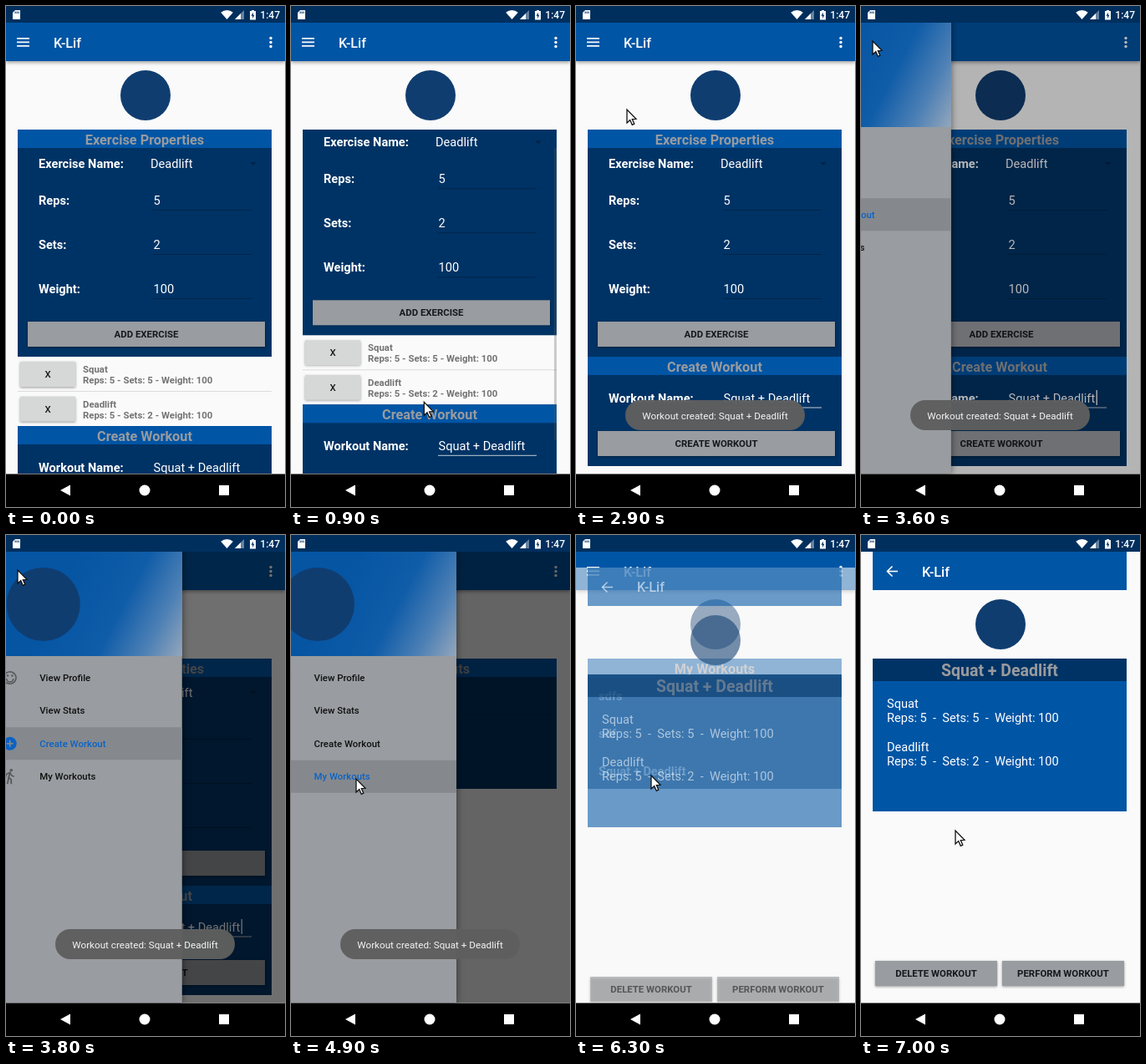
An HTML page with a canvas that plays this animation: 334x600 px, repeating every 7100 ms.

```html
<!DOCTYPE html>
<html lang="en">
<head>
<meta charset="utf-8">
<title>Workout app</title>
<style>
html, body { margin: 0; width: 100%; height: 100%; overflow: hidden; background: #fafafa; }
canvas { display: block; width: 334px; height: 600px; }
</style>
</head>
<body>
<canvas id="stage"></canvas>
<script>
const LOOP = 7100, STEP = 100;
const NAVY = '#003365', BLUE = '#0055a5', PAGE = '#fafafa', GRAY = '#999ca0', LOGO = '#103d70';
const APP_NAME = 'K-Lif', WORKOUT = 'Squat + Deadlift';
const SMALL = 11.4, BODY = 14.6, TITLE = 16.25;

const canvas = document.getElementById('stage');
const ratio = window.devicePixelRatio || 1;
canvas.width = 334 * ratio;
canvas.height = 600 * ratio;
const ctx = canvas.getContext('2d');

const clamp = x => Math.min(1, Math.max(0, x));
const progress = (t, from, to) => clamp((t - from) / (to - from));
const smooth = p => p * p * (3 - 2 * p);
const easeOut = p => 1 - (1 - p) ** 3;

function rect(x, y, w, h, color) {
  ctx.fillStyle = color;
  ctx.fillRect(x, y, w, h);
}

function disc(x, y, r, color) {
  ctx.fillStyle = color;
  ctx.beginPath();
  ctx.arc(x, y, r, 0, 7);
  ctx.fill();
}

function shape(points, color, outline) {
  ctx.beginPath();
  points.forEach(([x, y]) => ctx.lineTo(x, y));
  ctx.closePath();
  ctx.fillStyle = color;
  ctx.fill();
  if (outline) {
    ctx.strokeStyle = outline;
    ctx.lineWidth = 1.3;
    ctx.stroke();
  }
}

function line(points, color, width) {
  ctx.beginPath();
  points.forEach(([x, y]) => ctx.lineTo(x, y));
  ctx.strokeStyle = color;
  ctx.lineWidth = width;
  ctx.stroke();
}

function text(str, x, y, size, weight, color = '#fff', align = 'left') {
  ctx.font = `${weight} ${size}px Roboto, sans-serif`;
  ctx.fillStyle = color;
  ctx.textAlign = align;
  ctx.fillText(str, x, y);
}

function withShadow(blur, dy, alpha, draw) {
  ctx.save();
  ctx.shadowColor = `rgba(0,0,0,${alpha})`;
  ctx.shadowBlur = blur * ratio;
  ctx.shadowOffsetY = dy * ratio;
  draw();
  ctx.restore();
}

function button(label, x, y, w, weight = 700, color = GRAY) {
  withShadow(3, 1, 0.4, () => rect(x, y, w, 30, color));
  text(label, x + w / 2, y + 19, SMALL, weight, '#16181b', 'center');
}

function heading(label, y) {
  rect(14, y, 304, 22, BLUE);
  text(label, 166, y + 17.6, TITLE, 700, '#999b9e', 'center');
}

function field(label, value, y, underline) {
  text(label, 39, y, BODY, 700);
  text(value, 176.5, y, BODY, 400);
  rect(176, y + 6, 118, 1, underline);
}

function toolbar() {
  withShadow(4, 2, 0.35, () => rect(0, 20, 334, 46, BLUE));
  for (const y of [38, 42.5, 47]) rect(13, y, 15, 1.7, '#fff');
  for (const y of [38.5, 43.5, 48.5]) disc(317, y, 1.7, '#fff');
  text(APP_NAME, 57, 49.5, TITLE, 500);
}

function savedExercise(name, sets, y) {
  button('X', 17, y + 6, 66, 500, '#d6d7d7');
  text(name, 92, y + 19, SMALL, 700, '#737373');
  text(`Reps: 5 - Sets: ${sets} - Weight: 100`, 92, y + 32, SMALL, 700, '#737373');
}

function createPage(t) {
  const created = t >= 2200;
  const scroll = created ? 0 : 73 * smooth(progress(t, 700, 1200));
  const top = created ? 420 : 503;
  ctx.save();
  ctx.beginPath();
  ctx.rect(0, 148, 334, 412);
  ctx.clip();
  ctx.translate(0, -scroll);

  rect(14, 148, 304, 272, NAVY);
  heading('Exercise Properties', 148);
  text('Exercise Name:', 39, 194, BODY, 700);
  text('Deadlift', 173, 194, BODY, 400);
  shape([[292, 187], [300, 187], [296, 191]], '#002349');
  field('Reps:', '5', 238, '#00254b');
  field('Sets:', '2', 291, '#00254b');
  field('Weight:', '100', 344, '#00254b');
  button('ADD EXERCISE', 26, 378, 284);

  if (!created) {
    savedExercise('Squat', 5, 420);
    rect(14, 461, 304, 1, '#dcdcdc');
    savedExercise('Deadlift', 2, 461.5);
  }

  rect(14, top, 304, 131, NAVY);
  heading('Create Workout', top);
  field('Workout Name:', WORKOUT, top + 54.5, '#c3ccd6');
  const blink = t % 1000;
  if (t > 1200 && blink >= 350 && blink < 850) rect(281.5, top + 40, 1.5, 18, '#dfe5ec');
  button('CREATE WORKOUT', 26, top + 89, 284);
  ctx.restore();

  if (scroll > 0) {
    ctx.globalAlpha = 1 - progress(t, 1800, 2100);
    rect(315, 148 + scroll * 0.85, 3, 350, 'rgba(90,90,90,.3)');
    ctx.globalAlpha = 1;
  }
}

function workoutsPage() {
  rect(14, 148, 304, 156, NAVY);
  heading('My Workouts', 148);
  ['sdfs', 'sdf', WORKOUT].forEach((name, i) => {
    text(name, 27, 198 + i * 45, BODY, 700);
    if (i) rect(14, 170 + i * 45, 304, 1, '#002d5b');
  });
}

function detailPage() {
  rect(0, 20, 334, 540, PAGE);
  rect(14, 20, 304, 46, BLUE);
  line([[44, 43.5], [32, 43.5]], '#fff', 1.6);
  line([[37.5, 37.5], [31.5, 43.5], [37.5, 49.5]], '#fff', 1.6);
  text(APP_NAME, 73, 49.5, TITLE, 500);
  disc(167, 107, 30, LOGO);
  rect(14, 148, 304, 183, BLUE);
  rect(14, 148, 304, 27, NAVY);
  text(WORKOUT, 166, 169, 19.5, 700, '#999b9e', 'center');
  [['Squat', 5], ['Deadlift', 2]].forEach(([name, sets], i) => {
    text(name, 31, 207 + i * 51.5, BODY, 400);
    text(`Reps: 5  -  Sets: ${sets}  -  Weight: 100`, 31, 224 + i * 51.5, BODY, 400);
  });
  button('DELETE WORKOUT', 17, 510, 146);
  button('PERFORM WORKOUT', 169, 510, 146);
}

function menuIcon(index, y, color) {
  if (index === 0) {
    ctx.strokeStyle = color;
    ctx.lineWidth = 1.6;
    ctx.beginPath();
    ctx.arc(22, y, 7.3, 0, 7);
    ctx.moveTo(26, y + 1);
    ctx.arc(22, y + 1, 4, 0, Math.PI);
    ctx.stroke();
    disc(19.3, y - 2.5, 1.2, color);
    disc(24.7, y - 2.5, 1.2, color);
  } else if (index === 2) {
    disc(22, y, 8, color);
    rect(18, y - 0.8, 8, 1.6, '#85898d');
    rect(21.2, y - 4, 1.6, 8, '#85898d');
  } else if (index === 3) {
    disc(23.5, y - 7.5, 1.8, color);
    line([[17, y], [18, y - 3], [22, y - 5], [24, y - 1], [27, y]], color, 1.6);
    line([[22, y - 5], [20.5, y + 1], [23.5, y + 4], [23.5, y + 9]], color, 1.8);
    line([[20.5, y + 1], [19, y + 9]], color, 1.8);
  }
}

function drawer(open, shade, selected) {
  if (open <= 0) return;
  rect(0, 0, 334, 560, `rgba(0,0,0,${0.6 * shade})`);
  ctx.save();
  ctx.translate(-228 * (1 - open), 0);
  withShadow(8, 0, 0.5, () => rect(0, 0, 228, 560, GRAY));
  const sky = ctx.createLinearGradient(60, 110, 206, 186);
  sky.addColorStop(0, '#0555a3');
  sky.addColorStop(0.45, '#0f5ca8');
  sky.addColorStop(0.75, '#4d80b5');
  sky.addColorStop(1, '#93a6bb');
  rect(0, 0, 228, 145, sky);
  disc(62, 83, 44, LOGO);
  ['View Profile', 'View Stats', 'Create Workout', 'My Workouts'].forEach((label, i) => {
    const y = 171 + i * 39.4, active = i === selected;
    if (active) rect(0, y - 19.5, 228, 39, '#85898d');
    menuIcon(i, y, active ? '#0c62c4' : '#55585b');
    text(label, 57.5, y + 4, SMALL, 500, active ? '#0c62c4' : '#111');
  });
  ctx.restore();
}

function statusBar() {
  rect(0, 0, 334, 20, '#002f5e');
  shape([[11, 5], [17, 5], [17, 16], [8, 16], [8, 8]], '#fff');
  for (const x of [11, 13, 15]) rect(x - 0.4, 6.5, 1, 2.5, NAVY);
  ctx.fillStyle = '#fff';
  ctx.beginPath();
  ctx.moveTo(264.5, 16);
  ctx.arc(264.5, 16, 11, -Math.PI * 0.73, -Math.PI * 0.27);
  ctx.fill();
  shape([[274, 16], [285, 5], [285, 16]], 'rgba(255,255,255,.4)');
  shape([[274, 16], [281, 9], [281, 16]], '#fff');
  rect(292, 6, 7, 10.5, '#fff');
  rect(294, 5, 3, 1, '#fff');
  shape([[296, 7.5], [293.5, 11.8], [295.2, 11.8], [295, 15], [297.5, 10.8], [295.8, 10.8]], NAVY);
  text('1:47', 328, 15, 12, 500, '#fff', 'right');
}

function navigationBar() {
  rect(0, 560.5, 334, 40, '#000');
  shape([[65, 580], [77, 573.5], [77, 586.5]], '#fff');
  disc(166, 580, 6.5, '#fff');
  rect(255, 574, 12, 12, '#fff');
}

function toast(t) {
  const alpha = progress(t, 2200, 2500) * (1 - progress(t, 5700, 6100));
  if (!alpha) return;
  ctx.globalAlpha = alpha;
  ctx.fillStyle = 'rgba(94,94,94,.97)';
  ctx.beginPath();
  ctx.roundRect(59, 472, 215, 36, 18);
  ctx.fill();
  text('Workout created: ' + WORKOUT, 166.5, 494.5, 11.7, 400, '#f4f4f4', 'center');
  ctx.globalAlpha = 1;
}

// Pointer stops: time, x, y
const pointerPath = [
  [200, 172, 565], [600, 160, 500], [700, 160, 500], [1200, 158, 427], [1600, 148, 514],
  [2200, 148, 514], [2900, 61, 124], [3400, 14, 42], [3900, 14, 42], [4600, 78, 292],
  [4900, 78, 292], [5400, 97, 321], [5600, 97, 321], [6000, 90, 288], [6300, 90, 288],
  [7000, 113, 354]
];

function pointer(t) {
  const next = pointerPath.findIndex(stop => stop[0] >= t);
  if (next < 1) return;
  const [t0, x0, y0] = pointerPath[next - 1], [t1, x1, y1] = pointerPath[next];
  const p = smooth(progress(t, t0, t1));
  ctx.save();
  ctx.translate(x0 + (x1 - x0) * p, y0 + (y1 - y0) * p);
  shape([[0, 0], [0, 16], [3.7, 12.6], [6.3, 18.3], [8.8, 17.2], [6.3, 11.6], [11, 11.3]], '#fff', '#111');
  ctx.restore();
}

function render(t) {
  ctx.setTransform(ratio, 0, 0, ratio, 0, 0);
  rect(0, 0, 334, 600, PAGE);
  const detail = easeOut(progress(t, 6200, 6600));
  const onWorkouts = t >= 4800;

  if (detail < 1) {
    toolbar();
    disc(167, 107, 30, LOGO);
    onWorkouts ? workoutsPage() : createPage(t);
  }
  if (detail > 0) {
    ctx.save();
    ctx.globalAlpha = detail;
    ctx.translate(0, 45 * (1 - detail));
    detailPage();
    ctx.restore();
  }

  // While closing, the shade fades slightly after the panel starts to move.
  const opening = easeOut(progress(t, 3500, 4020));
  const open = onWorkouts ? 1 - smooth(progress(t, 4800, 5240)) : opening;
  const shade = onWorkouts ? 1 - smooth(progress(t, 4900, 5240)) : opening;
  drawer(open, shade, t >= 4700 ? 3 : 2);
  statusBar();
  navigationBar();
  toast(t);
  pointer(t);
}

function tick() {
  const t = performance.now() % LOOP;
  render(Math.floor(t / STEP) * STEP);
  requestAnimationFrame(tick);
}
tick();
</script>
</body>
</html>
```
